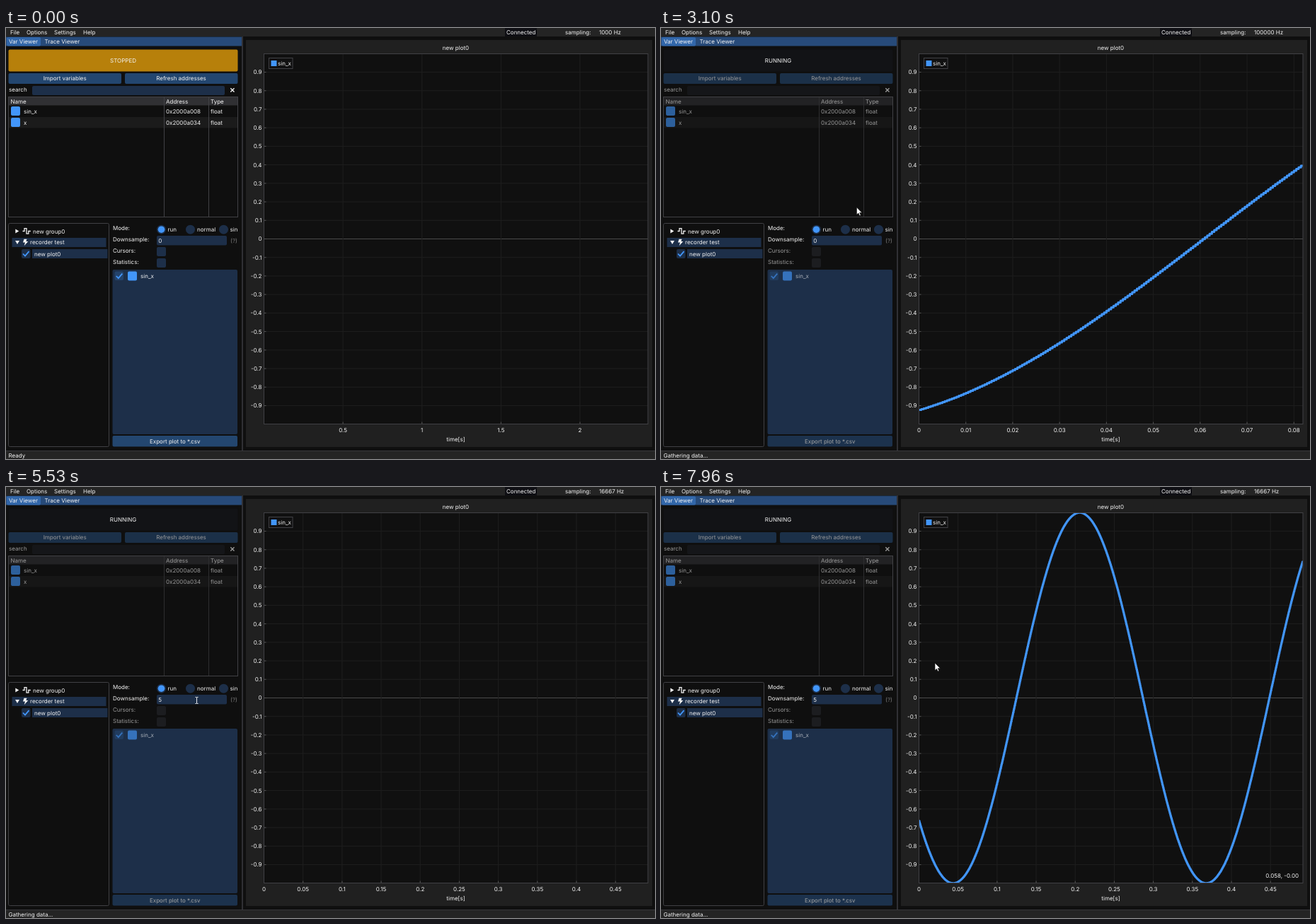
Animation of 917x610 px, one loop 8 s. Source, as an HTML page:

```html
<!DOCTYPE html>
<html lang="en">
<head>
<meta charset="utf-8">
<title>Variable viewer</title>
<style>
html, body { margin: 0; width: 100%; height: 100%; overflow: hidden; background: #0f0f0f; }
svg { display: block; width: 917px; height: 610px; }
text { font: 8px Inter, sans-serif; fill: #f4f4f4; text-rendering: geometricPrecision; white-space: pre; }
</style>
</head>
<body>
<svg id="stage" viewBox="0 0 917 610" xmlns="http://www.w3.org/2000/svg"></svg>
<script>
const NS = 'http://www.w3.org/2000/svg';
const stage = document.getElementById('stage');
let parent = stage;

function add(tag, attrs) {
  const el = document.createElementNS(NS, tag);
  for (const k in attrs) el.setAttribute(k, attrs[k]);
  parent.appendChild(el);
  return el;
}
const set = (el, k, v) => { if (el.getAttribute(k) !== String(v)) el.setAttribute(k, v); };
const show = (el, on) => set(el, 'visibility', on ? 'visible' : 'hidden');
const rect = (x, y, r, b, fill, rx = 0) => add('rect', { x, y, width: r - x, height: b - y, fill, rx });
const frame = (x, y, r, b, stroke, rx = 0) => {
  const el = rect(x + .5, y + .5, r - .5, b - .5, 'none', rx);
  el.setAttribute('stroke', stroke);
  return el;
};
const path = (d, stroke, w = 1, fill = 'none') => add('path', { d, stroke, 'stroke-width': w, fill });
function text(s, x, y, anchor = 'start') {
  const el = add('text', { x, y, 'text-anchor': anchor });
  el.textContent = s;
  return el;
}
const write = (el, s) => { if (el.textContent !== s) el.textContent = s; };
const group = (build, attrs = {}) => {
  const old = parent, g = add('g', attrs);
  parent = g; build(); parent = old;
  return g;
};

const BLUE = '#4296fa', FIELD = '#1d2f49', BUTTON = '#23466f', LINE = '#414145';
const swatch = (x, y) => rect(x, y, x + 13, y + 13, BLUE, 2);
const tick = (x, y) => path(`M${x + 2.5} ${y + 6.5}l3 3.2l5.5 -6.5`, BLUE, 1.8);

// Menu bar and status bar
rect(0, 0, 917, 12, '#242424');
rect(705, 0, 750, 12, '#0f0f14');
[['File', 6], ['Options', 29], ['Settings', 68], ['Help', 109], ['Connected', 707], ['sampling:', 790]]
  .forEach(([s, x]) => text(s, x, 8.8));
const rate = text('', 838, 8.8);
rect(0, 598, 917, 610, '#242424');
rect(0, 598, 917, 599, '#37373b');
const status = text('', 3.5, 608);

// Left panel
rect(0, 12.5, 333, 25.5, '#274a79');
rect(1, 13, 49, 25.5, '#3267aa', 2);
text('Var Viewer', 4, 22.2);
text('Trace Viewer', 54.5, 22.2);
rect(333, 12, 335, 598, '#303034');

const run = rect(3.5, 30.5, 327.5, 61.5, '#b7800b', 2);
const runText = text('', 165.5, 49, 'middle');

let search;
const vars = group(() => {
  rect(3.5, 64, 163, 79, BUTTON, 2);
  rect(168, 64, 327.5, 79, BUTTON, 2);
  text('Import variables', 83.2, 74.2, 'middle');
  text('Refresh addresses', 247.5, 74.2, 'middle');
  text('search', 4, 89.8);
  search = rect(37, 82, 309, 95, FIELD, 2);
  path('M317.3 85.3l5.2 5.2m0 -5.2l-5.2 5.2', '#f4f4f4', 1.4);
  rect(4, 98, 327, 109.5, '#303033');
  rect(4, 126, 327, 141.5, '#1b1b1b');
  path('M223.5 98V267M286.5 98V267', LINE);
  [['Name', 6.5], ['Address', 226], ['Type', 289]].forEach(([s, x]) => text(s, x, 106.8));
  [['sin_x', '0x2000a008'], ['x', '0x2000a034']].forEach(([name, addr], i) => {
    const y = 121 + 16 * i;
    swatch(7, y - 10);
    text(name, 25, y);
    text(addr, 226, y);
    text('float', 289, y);
  });
});
frame(3, 97, 328, 268, LINE);

// Plot tree
frame(3, 276, 146, 593, LINE, 2);
path('M13.3 284.5l5 3l-5 3z', 'none', 0, '#f4f4f4');
path('M23.5 287.5h2.5v-3.8h3v7.4h2.8v-3.6h3', '#f4f4f4', 1.3);
text('new group0', 38, 290.6);
rect(8.5, 297, 141.5, 310, FIELD);
path('M13 301h6l-3 5z', 'none', 0, '#f4f4f4');
path('M25.5 298.8h4l-1.2 3.2h3l-5.6 6.2l1.3 -4.6h-3z', 'none', 0, '#f4f4f4');
text('recorder test', 34, 306.4);
rect(22, 313, 34.5, 326, FIELD, 2);
tick(21.5, 313);
rect(37, 313, 143.5, 326, FIELD);
text('new plot0', 40, 322.5);

// Plot settings
text('Mode:', 151, 286.2);
[219.5, 260.5, 307.5].forEach(cx => add('circle', { cx, cy: 285.2, r: 6.5, fill: FIELD }));
add('circle', { cx: 219.5, cy: 285.2, r: 4.8, fill: BLUE });
text('run', 228.5, 288.2);
text('normal', 270, 288.2);
add('clipPath', { id: 'edge' }).innerHTML = '<rect x="310" y="278" width="17.5" height="14"/>';
text('single', 316.5, 288.2).setAttribute('clip-path', 'url(#edge)');
text('Downsample:', 151, 302);
rect(213, 294, 312, 307.5, FIELD, 2);
const value = text('', 215.3, 304);
const caret = rect(220, 297, 221, 306, '#f4f4f4');
text('(?)', 317, 304).style.fill = '#7f7f7f';
const boxes = [310, 326].map(y => rect(213, y, 226, y + 13, FIELD, 2));
const labels = group(() => {
  text('Cursors:', 151, 318);
  text('Statistics:', 151, 334);
});
rect(150.5, 342, 327, 575, FIELD, 2);
const items = group(() => {
  rect(153.5, 344.5, 166, 357, '#24436b', 2);
  tick(153.3, 344.5);
  swatch(172, 344.5);
  text('sin_x', 190, 353.8);
  rect(150.5, 577, 327, 592.5, BUTTON, 2);
  text('Export plot to *.csv', 238.8, 588, 'middle');
});

// Plot
const L = 364.5, R = 907, T = 36.5, B = 560.5, MID = 298.5, UNIT = 262.2;
rect(339, 17, 913, 593, '#202020');
rect(L, T, R, B, '#101010');
text('new plot0', 635.5, 31.2, 'middle');
text('time[s]', 635.5, 585, 'middle');
for (let i = -9; i <= 9; i++) {
  const y = MID - i * UNIT / 10;
  path(`M${L} ${y}H${R}`, i ? '#1e1e1e' : '#4b4b4b');
  path(`M${L} ${y}h3`, '#555');
  text(String(i / 10), 361.5, y + 2.9, 'end');
}
const axis = group(() => {});
add('clipPath', { id: 'area' }).innerHTML = `<rect x="${L}" y="${T}" width="${R - L}" height="${B - T}"/>`;
const curve = path('', BLUE, 3);
set(curve, 'clip-path', 'url(#area)');
set(curve, 'stroke-linejoin', 'round');
frame(364, 36, 907.5, 561, '#414145');
rect(371, 42, 405, 58, '#111');
frame(371, 42, 405.5, 58, '#414145');
rect(374.5, 46, 382.5, 54, BLUE);
text('sin_x', 384, 53.2);
const coords = text('', 901, 553, 'end');

const arrow = path('M0 0V10.6L2.5 8.4L4.2 12L5.9 11.2L4.3 7.7H7.6Z', '#111', .7, '#fff');
const beam = path('M-2 -4.5h1.5l.5 .5l.5 -.5h1.5M0 -4V4M-2 4.5h1.5l.5 -.5l.5 .5h1.5', '#fff', .9);

// Timeline
const AXES = [
  { from: 0, span: 2.43, step: .5, first: 1, digits: 2, rate: '1000 Hz' },
  { from: 1640, span: .08192, step: .01, first: 0, digits: 4, rate: '100000 Hz' },
  { from: 5050, span: .4915, step: .05, first: 0, digits: 3, rate: '16667 Hz' }
];
const OMEGA = 19.4, HOP = 3.806;
// Each capture starts at a fixed phase step after the previous one.
const CAPTURES = [2160, 2560, 2940, 3320, 3710, 4100, 4490, 4880]
  .map((from, i) => ({ from, phase: .154 + (i - 4) * HOP }));
CAPTURES.push({ from: 5050 }, { from: 6280, phase: -Math.PI / 2 }, { from: 7270, phase: -2.416 });
// time, x, y
const MOVES = [
  [330, 524, 546], [510, 500, 523], [780, 500, 523], [900, 455, 446], [1060, 326, 230],
  [1180, 253, 108], [1270, 231, 72], [1350, 199, 42], [2560, 199, 42], [2740, 212, 80],
  [3040, 272, 240], [3320, 292, 303], [3370, 290, 303], [3460, 269.5, 302], [6830, 269.5, 302],
  [6920, 373, 306], [6960, 411, 311], [7090, 447, 306], [7270, 447, 306], [7480, 430, 301],
  [7920, 430, 301], [7960, 387, 249]
];
const latest = (list, t) => list.filter(e => e.from <= t).pop();

function pointer(t) {
  const i = MOVES.findIndex(m => m[0] > t);
  if (i === 0) return null;
  if (i < 0) return MOVES[MOVES.length - 1].slice(1);
  const [t0, x0, y0] = MOVES[i - 1], [t1, x1, y1] = MOVES[i];
  const k = (t - t0) / (t1 - t0);
  return [x0 + (x1 - x0) * k, y0 + (y1 - y0) * k];
}

let drawnAxis, drawnCapture;
function drawAxis(a) {
  drawnAxis = a;
  axis.replaceChildren();
  parent = axis;
  for (let i = a.first; i * a.step < a.span; i++) {
    const x = L + i * a.step / a.span * (R - L);
    path(`M${x} ${T}V${B}`, '#1e1e1e');
    path(`M${x} ${B}v-3`, '#555');
    text(String(+(i * a.step).toFixed(2)), x, 572, 'middle');
  }
  parent = stage;
}

function drawCurve(c, a) {
  drawnCapture = c;
  let d = '';
  if (c && c.phase !== undefined) {
    const dt = .0005, px = (R - L) / a.span;
    for (let s = 0; s <= a.span; s += dt) {
      const x = (L + s * px).toFixed(1);
      const y = (MID - UNIT * Math.sin(c.phase + OMEGA * s)).toFixed(1);
      d += d ? `H${x}V${y}` : `M${x} ${y}`;
    }
    d += `H${R}`;
  }
  set(curve, 'd', d);
}

function render(t) {
  const a = latest(AXES, t), c = latest(CAPTURES, t), on = t >= 1640;
  if (a !== drawnAxis) drawAxis(a);
  if (c !== drawnCapture) drawCurve(c, a);
  write(rate, a.rate);
  write(status, on ? 'Gathering data...' : 'Ready');
  write(runText, on ? 'RUNNING' : 'STOPPED');
  write(value, t < 5050 ? '0' : '5');
  show(caret, (t >= 3620 && t < 4710) || (t >= 5050 && t < 5530));

  const p = pointer(t);
  const hover = p && p[0] < 327 && p[1] > 30 && p[1] < 61;
  set(run, 'fill', !on ? '#b7800b' : hover ? '#232424' : '#121316');
  const alpha = on ? .6 : 1;
  [vars, labels].forEach(g => set(g, 'opacity', alpha));
  set(items, 'opacity', on ? .65 : 1);
  set(search, 'fill', on ? '#191c21' : FIELD);
  boxes.forEach(b => set(b, 'fill', on ? '#1c1d20' : FIELD));

  const inField = p && p[0] > 213 && p[0] < 312 && p[1] > 294 && p[1] < 308;
  show(arrow, p && !inField);
  show(beam, inField);
  if (p) set(inField ? beam : arrow, 'transform', `translate(${p[0].toFixed(1)} ${p[1].toFixed(1)})`);

  // The readout trails the pointer slightly.
  const q = p && (pointer(t - 40) || p);
  const inPlot = q && q[0] > L && q[0] < R && q[1] > T && q[1] < B;
  write(coords, inPlot
    ? `${((q[0] - L) / (R - L) * a.span).toFixed(a.digits)}, ${((MID - q[1]) / UNIT).toFixed(2)}` : '');
}

const start = performance.now();
function loop() {
  render((performance.now() - start) % 8000);
  requestAnimationFrame(loop);
}
loop();
</script>
</body>
</html>
```
